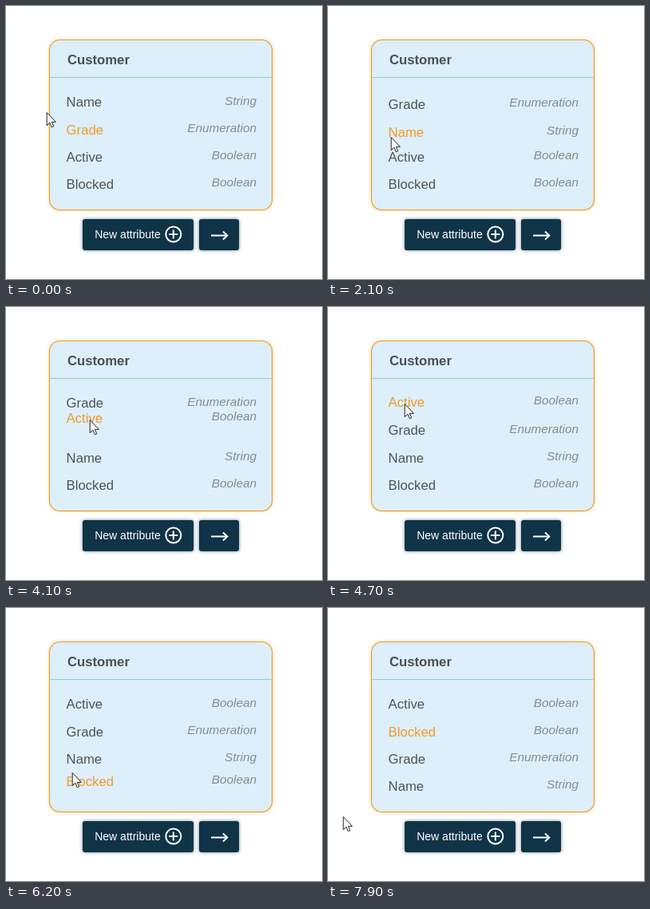
Write an HTML page with a canvas that moves like this. It is 396 by 342 pixels and loops after 8000 ms.

```html
<!DOCTYPE html>
<html lang="en">
<head>
<meta charset="utf-8">
<title>Reordering attributes</title>
<style>
  html, body { margin: 0; width: 100%; height: 100%; overflow: hidden; background: #fff; }
  canvas { display: block; }
</style>
</head>
<body>
<canvas id="stage" width="396" height="342"></canvas>
<script>
const ctx = document.getElementById('stage').getContext('2d');
const LOOP = 8000, STEP = 100, SHIFT = 250;
const TOP = 126.45, PITCH = 34.2, ROW = 34, TYPE_LIFT = 2.9, ROWS_LEFT = 68;
const FONT = '"Liberation Sans", Arial, sans-serif';
const ORANGE = '#f39b22', NAVY = '#0f3447';
const TYPES = { Name: 'String', Grade: 'Enumeration', Active: 'Boolean', Blocked: 'Boolean' };

// turning points of the pointer: time, x, y
const PATH = [
  [500, 51, 133], [1000, 106, 203], [1450, 79, 120], [1600, 79, 120],
  [2100, 79, 164], [2800, 76, 196], [3100, 76, 188], [3500, 113, 157],
  [3600, 113, 157], [4700, 96, 121], [5100, 96, 121], [5900, 70, 232],
  [6200, 83, 206], [6900, 83, 144], [7500, 83, 144], [7900, 19, 261]
];

const DRAGS = [
  { from: 0, to: 2, start: 1670, drop: 2800 },
  { from: 1, to: 0, start: 3610, drop: 4800 },
  { from: 3, to: 1, start: 6130, drop: 7000 }
];

const clamp = v => Math.max(0, Math.min(1, v));
const mix = (a, b, p) => a + (b - a) * p;
const ease = p => 1 - Math.pow(1 - clamp(p), 3);
const slot = i => TOP + PITCH * i;

function pointer(t) {
  const i = Math.max(1, PATH.findIndex(k => k[0] >= t));
  const [t0, x0, y0] = PATH[i - 1], [t1, x1, y1] = PATH[i];
  const p = clamp((t - t0) / (t1 - t0));
  return { x: mix(x0, x1, p), y: mix(y0, y1, p) };
}

const travel = (d, t) => pointer(t).y - pointer(d.start).y;
const dragging = t => DRAGS.some(d => t >= d.start && t <= d.drop);

// A neighbour gives way once the held row covers most of its place.
for (const d of DRAGS) {
  d.dir = Math.sign(d.to - d.from);
  d.swaps = [];
  for (let t = d.start; t < d.drop; t += 5) {
    if (d.dir * travel(d, t) >= ROW * (d.swaps.length + 0.7)) d.swaps.push(t);
  }
}

function layout(t) {
  let names = Object.keys(TYPES);
  for (const d of DRAGS) {
    if (t < d.start) break;
    const rows = names.map((name, i) => ({ name, y: slot(i) }));
    const held = Math.min(t, d.drop);
    rows[d.from].y += travel(d, held);
    d.swaps.forEach((s, n) => {
      rows[d.from + d.dir * (n + 1)].y -= d.dir * ROW * ease((held - s) / SHIFT);
    });
    rows.splice(d.to, 0, rows.splice(d.from, 1)[0]);
    const settled = (t - d.drop) / SHIFT;
    if (settled < 1) {
      return rows.map(({ name, y }, i) => ({ name, y: mix(y, slot(i), ease(settled)) }));
    }
    names = rows.map(r => r.name);
  }
  return names.map((name, i) => ({ name, y: slot(i) }));
}

// The highlight stays on the last row the free pointer touched.
const hovered = [];
for (let t = 0, name = 'Grade'; t < LOOP; t += STEP) {
  const { x, y } = pointer(t);
  if (x >= ROWS_LEFT && !dragging(t)) {
    const i = Math.round(clamp((y + 6 - TOP) / PITCH / 3) * 3);
    name = layout(t)[i].name;
  }
  hovered.push(name);
}

function text(str, x, y, style, color, align = 'left') {
  ctx.font = `${style} ${FONT}`;
  ctx.fillStyle = color;
  ctx.textAlign = align;
  ctx.fillText(str, x, Math.round(y));
}

function box(x, y, w, h, r, fill, glow) {
  ctx.save();
  ctx.shadowColor = glow;
  ctx.shadowBlur = 4;
  ctx.fillStyle = fill;
  ctx.beginPath();
  ctx.roundRect(x, y, w, h, r);
  ctx.fill();
  ctx.restore();
}

function line(...pts) {
  ctx.beginPath();
  pts.forEach(([x, y]) => ctx.lineTo(x, y));
  ctx.stroke();
}

function card() {
  box(54.5, 42.5, 279, 213, 13, '#dceffb', 'rgba(243,155,34,.6)');
  ctx.lineWidth = 1.1;
  ctx.strokeStyle = ORANGE;
  ctx.beginPath();
  ctx.roundRect(54.5, 42.5, 279, 213, 13);
  ctx.stroke();
  ctx.lineWidth = 1;
  ctx.strokeStyle = '#8fcbd6';
  line([55.5, 89.5], [332.5, 89.5]);
  text('Customer', 77, 73, 'bold 16.7px', '#4b4f53');
}

function buttons() {
  for (const [x, w] of [[96, 139], [242, 50]]) {
    box(x, 267, w, 39, 3, NAVY, 'rgba(15,52,71,.6)');
  }
  text('New attribute', 111.2, 291, '14px', '#fff');
  ctx.strokeStyle = '#fff';
  ctx.lineWidth = 2;
  ctx.beginPath();
  ctx.arc(209.8, 286, 9.5, 0, Math.PI * 2);
  ctx.stroke();
  line([204.3, 286], [215.3, 286]);
  line([209.8, 280.5], [209.8, 291.5]);
  line([257, 287.5], [277, 287.5]);
  line([272, 282.5], [277.3, 287.5], [272, 292.5]);
}

const ARROW = new Path2D('M.5 .5V16.7L4.2 13.2 6.6 18.8 9 17.8 6.6 12.3H11.7Z');
const HAND = new Path2D('M-1.5 13V1.6Q-1.5 0 .2 0T2 1.6V7.5Q4.4 6.2 5 8.2' +
  'Q7.2 7.2 7.8 9.2Q10.5 8.6 10.5 11.2V15.5Q10.2 18 8.6 19.8V22.8H-1V20.3' +
  'L-5 14.5Q-6 12.2-4.4 11.6T-1.5 13Z');

function drawPointer(t) {
  const { x, y } = pointer(t);
  const hand = x >= ROWS_LEFT && !dragging(t);
  const shape = hand ? HAND : ARROW;
  ctx.save();
  ctx.translate(Math.round(x) - 0.3, Math.round(y));
  ctx.fillStyle = '#fff';
  ctx.strokeStyle = '#222';
  ctx.lineWidth = 1;
  ctx.lineJoin = 'round';
  ctx.fill(shape);
  ctx.stroke(shape);
  if (hand) {
    line([2, 7.5], [2, 11.5]);
    line([5, 8.2], [5, 11.5]);
    line([7.8, 9.2], [7.8, 12]);
  }
  ctx.restore();
}

function draw(t) {
  ctx.fillStyle = '#fff';
  ctx.fillRect(0, 0, 396, 342);
  card();
  buttons();
  for (const { name, y } of layout(t)) {
    const color = name === hovered[t / STEP] ? ORANGE : '#4f5356';
    text(name, 75.6, y, '16.7px', color);
    text(TYPES[name], 314, y - TYPE_LIFT, 'italic 15.3px', '#858b90', 'right');
  }
  drawPointer(t);
}

const began = performance.now();
function tick() {
  const t = Math.max(0, performance.now() - began) % LOOP;
  draw(Math.floor(t / STEP) * STEP);
  requestAnimationFrame(tick);
}
tick();
</script>
</body>
</html>
```
